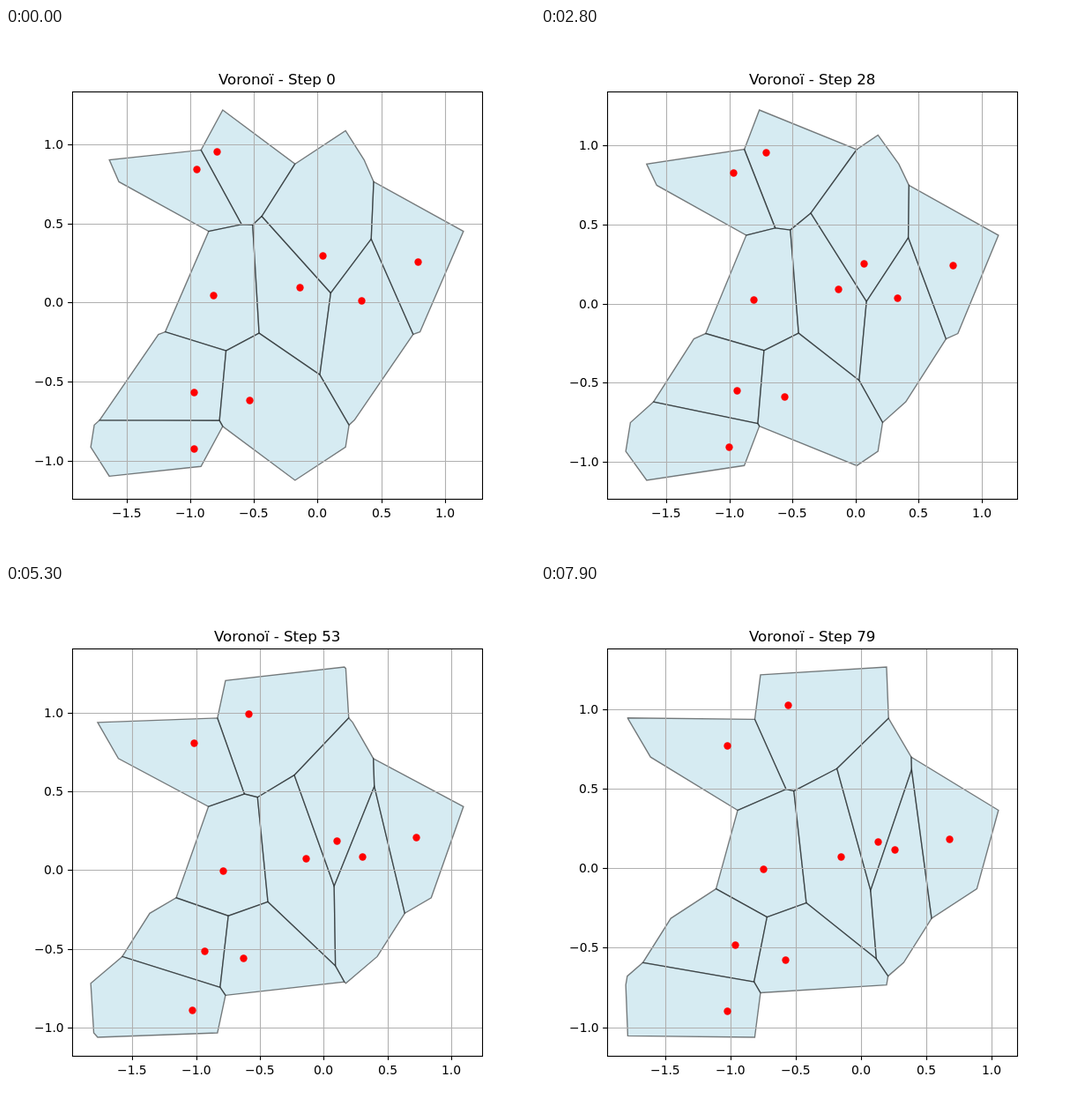
Recreate the animation shown at these times as an HTML page with a canvas. Size 600x600 px, loop 8 s.

```html
<!DOCTYPE html>
<html lang="en">
<head>
<meta charset="utf-8">
<title>Periodic Voronoï cells</title>
<style>
  html, body { margin: 0; width: 100%; height: 100%; overflow: hidden; background: #fff; }
  canvas { display: block; width: 600px; height: 600px; }
</style>
</head>
<body>
<canvas id="stage" width="600" height="600"></canvas>
<script>
const ctx = document.getElementById('stage').getContext('2d');
const STEPS = 80, STEP_MS = 100, PERIOD = 2;
const PT = 100 / 72;
const BOX = { left: 75, top: 72, right: 540, bottom: 534 };

// Each seed follows a cubic through four points (x, y in thousandths).
const KEYS = [0, 28, 53, 79];
const PATHS = [
  [[-790, 954], [-712, 957], [-590, 996], [-562, 1030]],
  [[-951, 845], [-970, 830], [-1020, 808], [-1029, 775]],
  [[-817, 46], [-810, 25], [-790, -2], [-751, -6]],
  [[-139, 96], [-141, 92], [-143, 77], [-155, 75]],
  [[42, 298], [64, 254], [101, 185], [127, 170]],
  [[345, 16], [328, 37], [300, 86], [255, 117]],
  [[788, 258], [769, 243], [722, 211], [676, 186]],
  [[-970, -567], [-943, -548], [-934, -515], [-967, -482]],
  [[-533, -618], [-565, -588], [-631, -558], [-582, -576]],
  [[-971, -924], [-1002, -904], [-1029, -888], [-1026, -897]]
];

// Share of each key in the cubic at a step (Lagrange weights).
const weights = step => KEYS.map(k =>
  KEYS.reduce((w, other) => other === k ? w : w * (step - other) / (k - other), 1));

function seedsAt(step) {
  const w = weights(step);
  return PATHS.map(path => [0, 1].map(axis =>
    path.reduce((sum, point, i) => sum + w[i] * point[axis], 0) / 1000));
}

// Keep the part of a polygon that is nearer to p than to q.
function clip(poly, p, q) {
  const nx = q[0] - p[0], ny = q[1] - p[1];
  const c = (nx * (p[0] + q[0]) + ny * (p[1] + q[1])) / 2;
  const side = a => a[0] * nx + a[1] * ny - c;
  const out = [];
  poly.forEach((a, i) => {
    const b = poly[(i + 1) % poly.length];
    const da = side(a), db = side(b);
    if (da <= 0) out.push(a);
    if (da * db < 0) {
      const t = da / (da - db);
      out.push([a[0] + t * (b[0] - a[0]), a[1] + t * (b[1] - a[1])]);
    }
  });
  return out;
}

// Cells of the seeds on a plane that repeats in both directions.
function voronoi(seeds) {
  const shifts = [-PERIOD, 0, PERIOD];
  const copies = seeds.flatMap(([x, y]) =>
    shifts.flatMap(dx => shifts.map(dy => [x + dx, y + dy])));
  return seeds.map(p => {
    let cell = [[-2, -2], [2, -2], [2, 2], [-2, 2]].map(([x, y]) => [p[0] + x, p[1] + y]);
    for (const q of copies)
      if (q[0] !== p[0] || q[1] !== p[1]) cell = clip(cell, p, q);
    return cell;
  });
}

// Linear scale with a 5% margin at both ends.
function scale(values, from, to) {
  const lo = Math.min(...values), hi = Math.max(...values);
  const pad = (hi - lo) * 0.05;
  return v => from + (to - from) * (v - lo + pad) / (hi - lo + 2 * pad);
}

const snap = v => Math.round(v) + 0.5;

function line(color, x1, y1, x2, y2) {
  ctx.strokeStyle = color;
  ctx.beginPath();
  ctx.moveTo(x1, y1);
  ctx.lineTo(x2, y2);
  ctx.stroke();
}

// The anchor is the part of the width that lies left of x.
function text(str, x, y, size, anchor) {
  ctx.font = size * PT + 'px "DejaVu Sans", sans-serif';
  ctx.fillText(str, Math.round(x - anchor * ctx.measureText(str).width), Math.round(y));
}

function ticks(from, to, each) {
  for (let v = from; v <= to; v += 0.5)
    each(v, v.toFixed(1).replace('-', '\u2212'));
}

function draw(step) {
  const seeds = seedsAt(step);
  const cells = voronoi(seeds);
  const corners = cells.flat();
  const sx = scale(corners.map(c => c[0]), BOX.left, BOX.right);
  const sy = scale(corners.map(c => c[1]), BOX.bottom, BOX.top);

  ctx.fillStyle = '#fff';
  ctx.fillRect(0, 0, 600, 600);

  ctx.fillStyle = 'rgba(173,216,230,0.5)';
  ctx.strokeStyle = 'rgba(0,0,0,0.5)';
  ctx.lineWidth = PT;
  for (const cell of cells) {
    ctx.beginPath();
    for (const [x, y] of cell) ctx.lineTo(sx(x), sy(y));
    ctx.closePath();
    ctx.fill();
    ctx.stroke();
  }

  // Grid, ticks and labels
  const mark = 3.5 * PT, gray = '#b0b0b0';
  ctx.lineWidth = 0.8 * PT;
  ctx.fillStyle = '#000';
  ticks(-1.5, 1, (v, label) => {
    const x = snap(sx(v));
    line(gray, x, BOX.top, x, BOX.bottom);
    line('#000', x, BOX.bottom, x, BOX.bottom + mark);
    text(label, sx(v), 555, 10, 0.5);
  });
  ticks(-1, 1, (v, label) => {
    const y = snap(sy(v));
    line(gray, BOX.left, y, BOX.right, y);
    line('#000', BOX.left - mark, y, BOX.left, y);
    text(label, BOX.left - 2 * mark, sy(v) + 5, 10, 1);
  });

  ctx.fillStyle = '#f00';
  for (const [x, y] of seeds) {
    ctx.beginPath();
    ctx.arc(snap(sx(x)), snap(sy(y)), 3 * PT, 0, 2 * Math.PI);
    ctx.fill();
  }

  ctx.strokeRect(snap(BOX.left), snap(BOX.top), BOX.right - BOX.left, BOX.bottom - BOX.top);
  ctx.fillStyle = '#000';
  text('Voronoï - Step ' + step, (BOX.left + BOX.right) / 2, 64, 12, 0.5);
}

let start, shown = 0;
function tick(now) {
  start ??= now;
  const step = Math.floor((now - start) / STEP_MS) % STEPS;
  if (step !== shown) draw(shown = step);
  requestAnimationFrame(tick);
}
draw(shown);
requestAnimationFrame(tick);
</script>
</body>
</html>
```
